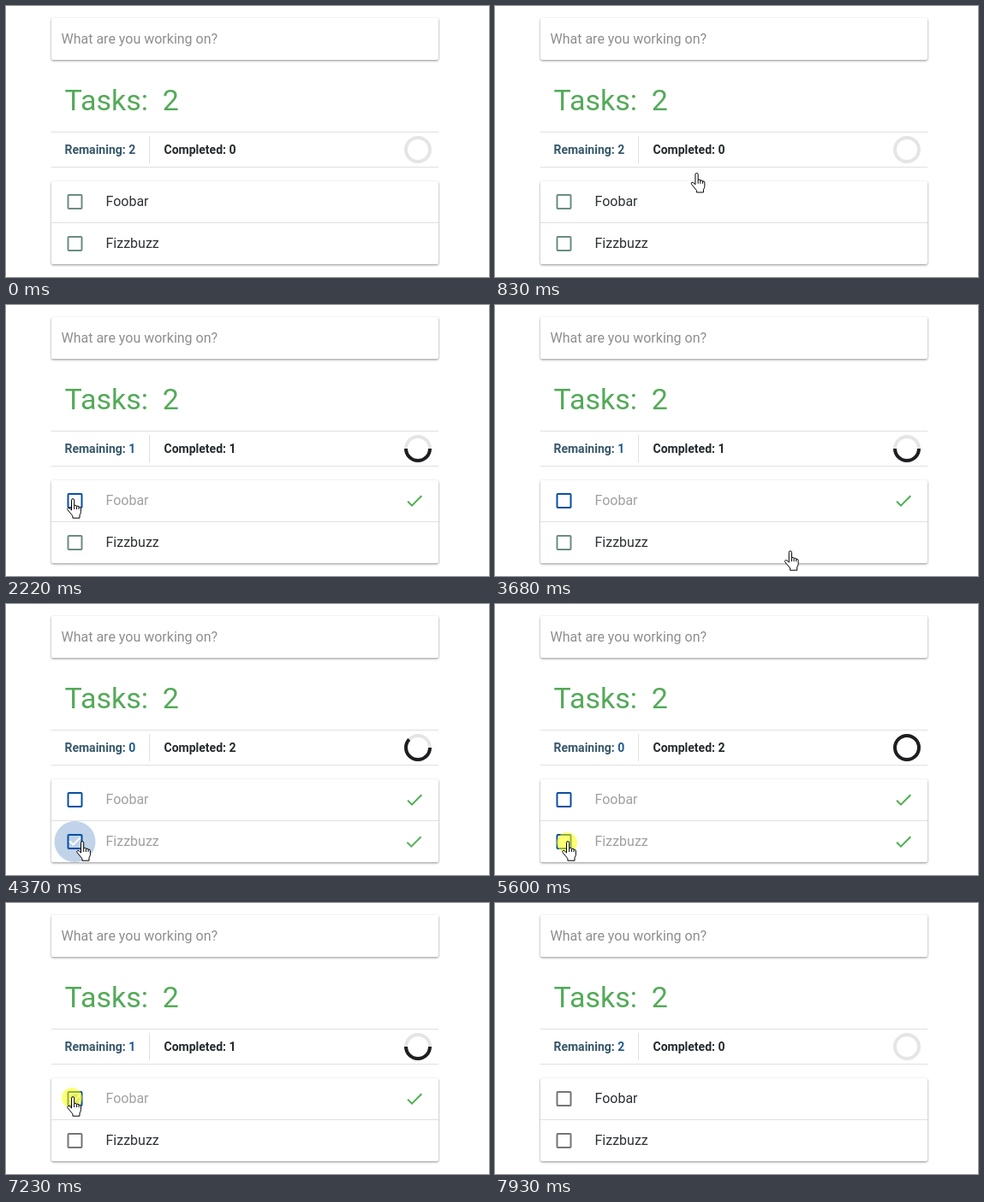
An HTML page for the animation above (8860 ms loop, 564 by 317 pixels).

```html
<!DOCTYPE html>
<html lang="en">
<head>
<meta charset="utf-8">
<title>Tasks</title>
<style>
html, body { margin: 0; width: 100%; height: 100%; overflow: hidden; background: #fff; }
svg { display: block; width: 564px; height: 317px; font: 16px Roboto, sans-serif; }
.card { fill: #fff; filter: drop-shadow(0 1px 1px rgba(0,0,0,.32)) drop-shadow(0 1px 1.5px rgba(0,0,0,.14)); }
.line { fill: #e0e0e0; }
.stat { font-size: 14px; font-weight: 700; }
.title { font-size: 34px; fill: #54aa59; }
.ring { fill: none; stroke-width: 4; }
.icon { fill: none; stroke-width: 2; }
</style>
</head>
<body>
<svg viewBox="0 0 564 317">
  <rect class="card" x="53" y="14" width="452" height="49" rx="2"/>
  <text x="64.5" y="44" fill="#8e8e8e">What are you working on?</text>
  <text class="title" x="68.5" y="122">Tasks:</text>
  <text class="title" x="182.7" y="122">2</text>

  <rect class="line" x="53" y="147" width="452" height="1"/>
  <rect class="line" x="53" y="188" width="452" height="1"/>
  <rect class="line" x="167" y="152" width="1" height="32"/>
  <text class="stat" x="68.5" y="173" fill="#36586a">Remaining: <tspan id="left"></tspan></text>
  <text class="stat" x="184.5" y="173" fill="#23292d">Completed: <tspan id="done"></tspan></text>
  <circle class="ring" cx="481" cy="168" r="14" stroke="#e5e5e5"/>
  <circle class="ring" id="ring" cx="481" cy="168" r="14" stroke="#1e1e22" pathLength="100"/>

  <rect class="card" x="53" y="205" width="452" height="97" rx="2"/>
  <rect class="line" x="53" y="253" width="452" height="1"/>
  <g id="rows"></g>

  <g id="pointer">
    <circle id="press" cx="6" cy="2" r="12" fill="#ff0" fill-opacity=".55"/>
    <g stroke="#000" stroke-linejoin="round">
      <path fill="#fff" d="M5.5 14V2.3a1.6 1.6 0 0 1 3.2 0V8.5q2.4-1 2.7.8 2.3-.9 2.6.9 2.4-.6 2.4 1.6v4q0 2-1.4 4v3.4H6.9v-2.4L1 13.6q-.8-1.6.6-2.2 1.5-.4 3.9 2.6z"/>
      <path fill="none" d="M8.7 8.5V13m2.7-3.7V13m2.6-2.8V13"/>
    </g>
  </g>
</svg>
<script>
const LOOP = 8860, PRESS = 85;
const BLUE = '#064fa2', GREY = '#757575', TEAL = '#6b8c82';

const clicks = [
  { at: 1530, row: 0, on: true },
  { at: 4095, row: 1, on: true },
  { at: 5600, row: 1, on: false },
  { at: 7150, row: 0, on: false }
];

// The pointer rests at OUT unseen; bow bends a move sideways
const OUT = [464, 292], FIRST = [71, 226], SECOND = [82, 277], NUDGED = [78, 277];
const moves = [
  { from: 440, until: 1130, to: FIRST, bow: [0, -60] },
  { from: 3000, until: 3220, to: OUT },
  { from: 3450, until: 4050, to: SECOND },
  { from: 4960, until: 5220, to: NUDGED },
  { from: 6270, until: 6540, to: FIRST, bow: [-5, 0] },
  { from: 7640, until: 7930, to: OUT }
];

const $ = id => document.getElementById(id);
const clamp = v => Math.max(0, Math.min(1, v));
const smooth = v => (v = clamp(v), v * v * (3 - 2 * v));
const easeOut = v => 1 - (1 - clamp(v)) ** 3;
const set = (el, attrs) => { for (const k in attrs) el.setAttribute(k, attrs[k]); };

const rows = ['Foobar', 'Fizzbuzz'].map((name, i) => {
  const g = document.createElementNS('http://www.w3.org/2000/svg', 'g');
  set(g, { transform: `translate(0 ${i * 49})` });
  g.innerHTML = `<circle cx="80.5" cy="229"/>
    <rect class="icon" x="72.5" y="221" width="16" height="16" rx="1"/>
    <path class="icon" d="M74.2 228.3l4.3 4.3 8.3-8.3" stroke="#fff"/>
    <text x="116.5" y="234">${name}</text>
    <path class="icon" d="M469.1 229.7l4.9 4.9 11.3-11.3" stroke="#4caf50"/>`;
  $('rows').append(g);
  const [ripple, box, mark, label, tick] = g.children;
  return { ripple, box, mark, label, tick };
});

function drawRow({ ripple, box, mark, label, tick }, row, t) {
  const click = clicks.filter(c => c.row === row && c.at <= t).pop();
  const age = click ? t - click.at : -1;
  const toggled = age >= PRESS;
  const on = !!click && click.on === toggled;
  set(box, { fill: on ? BLUE : 'none', stroke: on ? BLUE : toggled ? GREY : TEAL });
  set(mark, { opacity: +on });
  set(label, { fill: on ? '#a0a0a0' : '#2d3236' });
  set(ripple, {
    r: 24 * smooth(age / 250),
    fill: on ? BLUE : GREY,
    opacity: 0.25 * clamp(1 - (age - 330) / 300)
  });
  const k = easeOut((age - PRESS) / 300);
  const entering = !click || click.on;
  set(tick, {
    opacity: entering ? k : 1 - k,
    transform: `translate(${entering ? 15 * (k - 1) : 15 * k})`
  });
  return on;
}

function drawPointer(t) {
  const i = moves.findLastIndex(m => m.from <= t);
  const { from, until, to, bow = [0, 0] } = moves[i] || { from: 0, until: 1, to: OUT };
  const start = i > 0 ? moves[i - 1].to : OUT;
  const k = smooth((t - from) / (until - from));
  const place = start.map((v, n) => v + (to[n] - v) * k + bow[n] * 4 * k * (1 - k));
  const hidden = to === OUT && t >= until || i < 0;
  const down = clicks.some(c => t >= c.at && t < c.at + PRESS);
  set($('pointer'), { transform: `translate(${place})`, opacity: +!hidden });
  set($('press'), { opacity: +down });
}

function draw(t) {
  const done = rows.filter((r, i) => drawRow(r, i, t)).length;
  $('left').textContent = rows.length - done;
  $('done').textContent = done;
  set($('left'), { fill: t < clicks[0].at + PRESS ? '#36586a' : '#1f5a92' });

  const part = clicks.reduce((sum, c) => sum + (c.on ? 50 : -50) * smooth((t - c.at - PRESS) / 600), 0);
  set($('ring'), { 'stroke-dasharray': `${part} 200`, opacity: +(part > 0.01) });
  drawPointer(t);
}

const start = performance.now();
function frame() {
  draw((performance.now() - start) % LOOP);
  requestAnimationFrame(frame);
}
frame();
</script>
</body>
</html>
```
